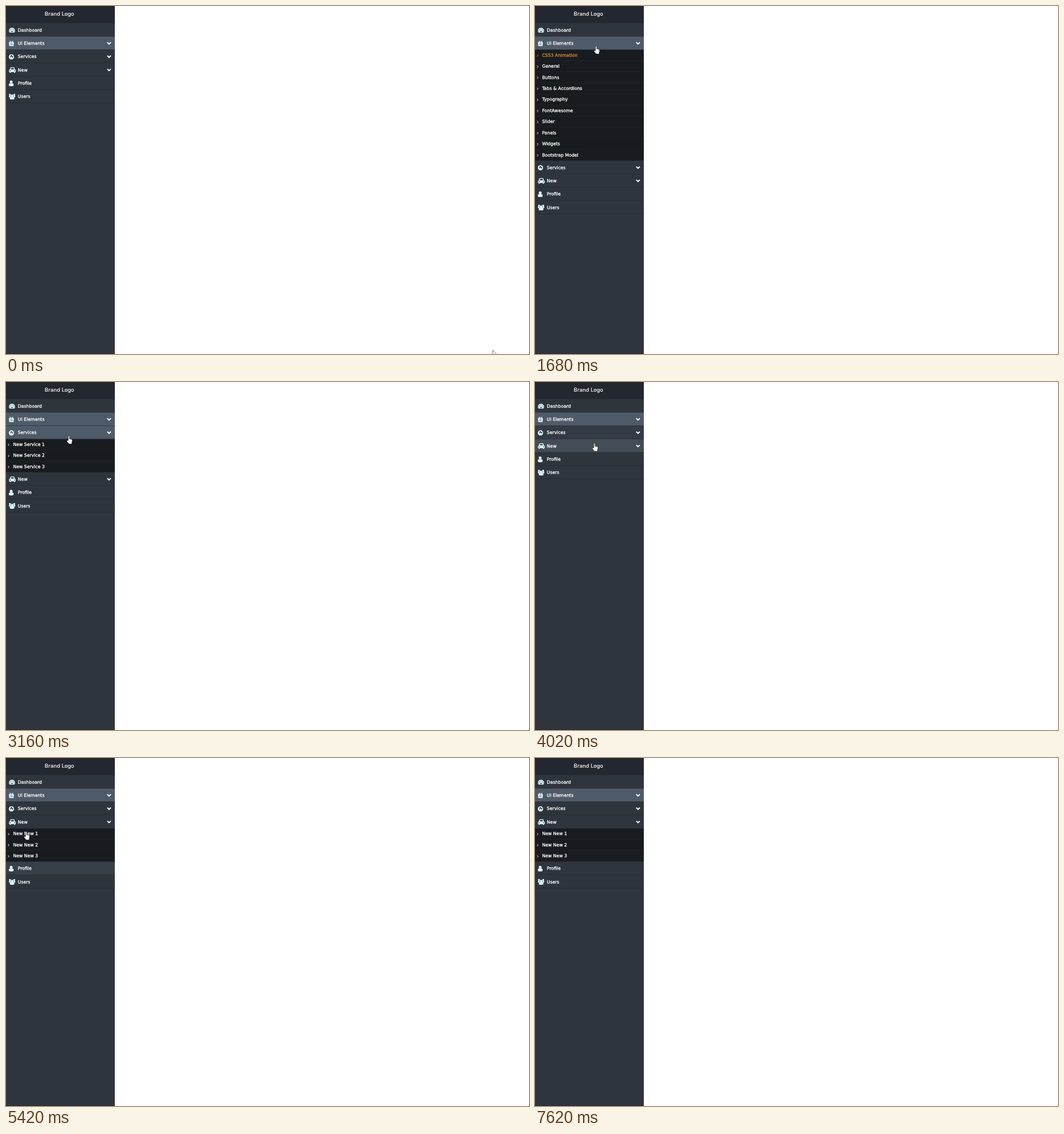
Write an HTML page with a canvas that moves like this. It is 918 by 610 pixels and loops after 8000 ms.

```html
<!DOCTYPE html>
<html lang="en">
<head>
<meta charset="utf-8">
<title>Sidebar menu</title>
<style>
  html, body { margin: 0; width: 100%; height: 100%; overflow: hidden; background: #fff; }
  canvas { display: block; }
</style>
</head>
<body>
<canvas id="stage" width="918" height="610"></canvas>
<script>
const ctx = document.getElementById('stage').getContext('2d');
const LOOP = 8000, STEP = 77, SLIDE = 350, FADE = 1000;
const SCALE = 0.648, WIDTH = 191, TOP = 30.2, ROW = 36 * SCALE, SUB = 30 * SCALE;
const BASE = [46, 53, 61], LIT = [79, 91, 105], SUB_BASE = [24, 28, 32], SUB_LIT = [2, 2, 3];
const LINE = '#23282e', ICON = '#e1ffff', ACCENT = '#d18d32';
const FONT = 'Verdana, "DejaVu Sans", sans-serif';

// Pointer moves: start, end, and the left and top it reaches.
// The screen is refreshed every STEP during a move and stands still between moves.
const moves = [
  { from: 0, to: 0, x: 854, y: 603 },
  { from: 70, to: 840, x: 103, y: 76 },
  { from: 890, to: 970, x: 103, y: 69.5 },
  { from: 1140, to: 1680, x: 103, y: 69.5 },
  { from: 2080, to: 2540, x: 104, y: 93 },
  { from: 2690, to: 3160, x: 106, y: 94 },
  { from: 3420, to: 4020, x: 100, y: 107 },
  { from: 4170, to: 4870, x: 84, y: 185 },
  { from: 5100, to: 5420, x: 31, y: 129 },
  { from: 5700, to: 5720, x: 31, y: 129 },
  { from: 5950, to: 6120, x: 29, y: 152 },
  { from: 6500, to: 6660, x: 100, y: 98 },
  { from: 6660, to: 7290, x: 940, y: 575 }
];

const numbered = label => [1, 2, 3].map(n => label + ' ' + n);
// "hover" and "open" give the start and end times of each state.
const menu = [
  { label: 'Dashboard', icon: gauge },
  { label: 'UI Elements', icon: gift, hover: [-FADE, 1e9], open: [1120, 2060],
    subs: ['CSS3 Animation', 'General', 'Buttons', 'Tabs & Accordions', 'Typography',
           'FontAwesome', 'Slider', 'Panels', 'Widgets', 'Bootstrap Model'] },
  { label: 'Services', icon: globe, hover: [2300, 3420], open: [2670, 3400],
    subs: numbered('New Service') },
  { label: 'New', icon: car, hover: [3600, 4170], open: [4150, 1e9],
    subs: numbered('New New'), subHover: [[5400, 5950], [5950, 6500]] },
  { label: 'Profile', icon: user, hover: [4640, 5000] },
  { label: 'Users', icon: users }
];

const chevron = new Path2D('M177.8-1.6L180.9 1.4L184-1.6');
const caret = new Path2D('M3.6-1.1L5.4.9L3.6 2.9');
const hand = new Path2D('M3.2 8.8V1.6a1.1 1.1 0 0 1 2.2 0V5.5L9 6.4Q10.5 6.8 10.5 8.3L9.2 14.6H4.6L.9 10.2Q.2 8.9 1.2 8.4Q2.1 7.9 3.2 8.8Z');
const arrow = new Path2D('M.4.4V10.6L2.8 8.4L4.4 12L6 11.3L4.4 7.8H7.6Z');

function dot(x, y, r, color = ICON, start = 0, end = 2 * Math.PI) {
  ctx.fillStyle = color;
  ctx.beginPath();
  ctx.arc(x, y, r, start, end);
  ctx.fill();
}

function box(x, y, w, h, r = 0, color = ICON) {
  ctx.fillStyle = color;
  ctx.beginPath();
  ctx.roundRect(x, y, w, h, r);
  ctx.fill();
}

// Icons are drawn around the centre of their row; "hole" is the row colour.
function gauge(hole) {
  dot(10.5, 1.5, 5.3, ICON, .8 * Math.PI, .2 * Math.PI);
  for (let i = 0; i < 5; i++) {
    const angle = -Math.PI * i / 4;
    dot(10.5 + 3.6 * Math.cos(angle), 1.8 + 3.6 * Math.sin(angle), .7, hole);
  }
  dot(10.5, 2.6, 1.2, hole);
}

function gift(hole) {
  box(5, -1.2, 9, 2.6, .4);
  box(5.7, 1.7, 7.6, 3.3, .4);
  for (const side of [-1, 1]) {
    dot(9.5 + 1.8 * side, -2.3, 1.6);
    dot(9.5 + 1.8 * side, -2.3, .6, hole);
    box(9.2 + 1.1 * side, -.6, .6, 5, 0, hole);
  }
}

function globe(hole) {
  dot(9.6, .7, 4.6);
  dot(9.4, -1, 1.4, hole);
  dot(11.4, .6, 1.3, hole);
  dot(8, .6, .9, hole);
}

function car(hole) {
  box(7.2, -4.4, 8, 5, 1.8);
  box(8.7, -3.1, 5, 2.6, .5, hole);
  box(5.2, -.5, 12, 4.6, 1.5);
  for (const side of [-1, 1]) {
    box(10.2 + 3.8 * side, 3.4, 2, 2, .7);
    dot(11.2 + 3.9 * side, 1.8, .9, hole);
  }
}

function user() {
  dot(9.1, -2, 2.5);
  box(4.9, .3, 8.5, 5, 2.2);
}

function users(hole) {
  for (const side of [-1, 1]) {
    dot(10.7 + 3.7 * side, -3, 1.7);
    box(9 + 3.9 * side, -1.5, 3.4, 3, 1);
  }
  dot(10.7, -.9, 2.8, hole);
  dot(10.7, -.9, 2.4);
  box(6.6, 1, 8.2, 4.4, 1.8);
}

// The CSS "ease" curve, solved by bisection.
function ease(x) {
  if (x <= 0) return 0;
  if (x >= 1) return 1;
  const bez = (u, p, q) => 3 * u * (1 - u) * (1 - u) * p + 3 * u * u * (1 - u) * q + u * u * u;
  let lo = 0, hi = 1;
  for (let i = 0; i < 20; i++) {
    const mid = (lo + hi) / 2;
    if (bez(mid, .25, .25) < x) lo = mid; else hi = mid;
  }
  return bez(lo, .1, 1);
}

function level(span, t, duration) {
  if (!span) return 0;
  return ease((t - span[0]) / duration) - ease((t - span[1]) / duration);
}

const mix = (a, b, k) => `rgb(${a.map((v, i) => Math.round(v + (b[i] - v) * k))})`;

function band(y, h, color) {
  ctx.fillStyle = color;
  ctx.fillRect(0, y, WIDTH, h);
}

function text(str, x, y, size, color, weight) {
  ctx.font = `${size * SCALE}px ${FONT}`;
  ctx.fillStyle = ctx.strokeStyle = color;
  ctx.lineWidth = weight;
  ctx.fillText(str, x, y);
  ctx.strokeText(str, x, y);
}

function outline(path, x, y, color, width, fill) {
  ctx.save();
  ctx.translate(x, y);
  if (fill) {
    ctx.fillStyle = fill;
    ctx.fill(path);
  }
  ctx.strokeStyle = color;
  ctx.lineWidth = width;
  ctx.stroke(path);
  ctx.restore();
}

function drawSubs({ subs, subHover = [] }, y, height, t) {
  ctx.save();
  ctx.beginPath();
  ctx.rect(0, y, WIDTH, height);
  ctx.clip();
  subs.forEach((label, i) => {
    const top = y + i * SUB, color = label === 'CSS3 Animation' ? ACCENT : '#fff';
    band(top, SUB, mix(SUB_BASE, SUB_LIT, level(subHover[i], t, FADE)));
    band(top + SUB - SCALE, SCALE, LINE);
    outline(caret, 0, top + 9, color, .9);
    text(label, 12.4, top + 11.8, 12, color, .3);
  });
  ctx.restore();
}

function drawRow(item, y, t) {
  const mid = y + 11.6, color = mix(BASE, LIT, level(item.hover, t, FADE));
  band(y, ROW, color);
  band(y + ROW - SCALE, SCALE, LINE);
  ctx.save();
  ctx.translate(0, mid);
  item.icon(color);
  ctx.restore();
  text(item.label, 20.8, mid + 2.9, 12, '#fff', .3);
  if (item.subs) outline(chevron, 0, mid + .2, '#f4ffff', 1.9);
}

function draw(clock) {
  const n = moves.findLastIndex(m => m.from <= clock);
  const move = moves[n], last = moves[Math.max(0, n - 1)];
  const t = Math.min(move.to, move.from + Math.floor((clock - move.from) / STEP) * STEP);

  ctx.fillStyle = '#fff';
  ctx.fillRect(0, 0, 918, 610);
  band(0, 610, mix(BASE, LIT, 0));
  band(0, TOP, LINE);
  band(609, 1, '#29292f');
  text('Brand Logo', 68, 17.4, 14, '#fff', .2);

  let y = TOP;
  for (const item of menu) {
    drawRow(item, y, t);
    y += ROW;
    if (!item.subs) continue;
    const height = item.subs.length * SUB * level(item.open, t, SLIDE);
    if (height > 0) drawSubs(item, y, height, t);
    y += height;
  }

  const k = ease((t - move.from) / (move.to - move.from || 1));
  const px = n ? last.x + (move.x - last.x) * k : move.x;
  const py = n ? last.y + (move.y - last.y) * k : move.y;
  if (px < WIDTH - 4) outline(hand, px, py, '#15181c', .6, '#fff');
  else outline(arrow, px, py, '#333', .7, '#fff');
}

function tick() {
  draw(performance.now() % LOOP);
  requestAnimationFrame(tick);
}
tick();
</script>
</body>
</html>
```
